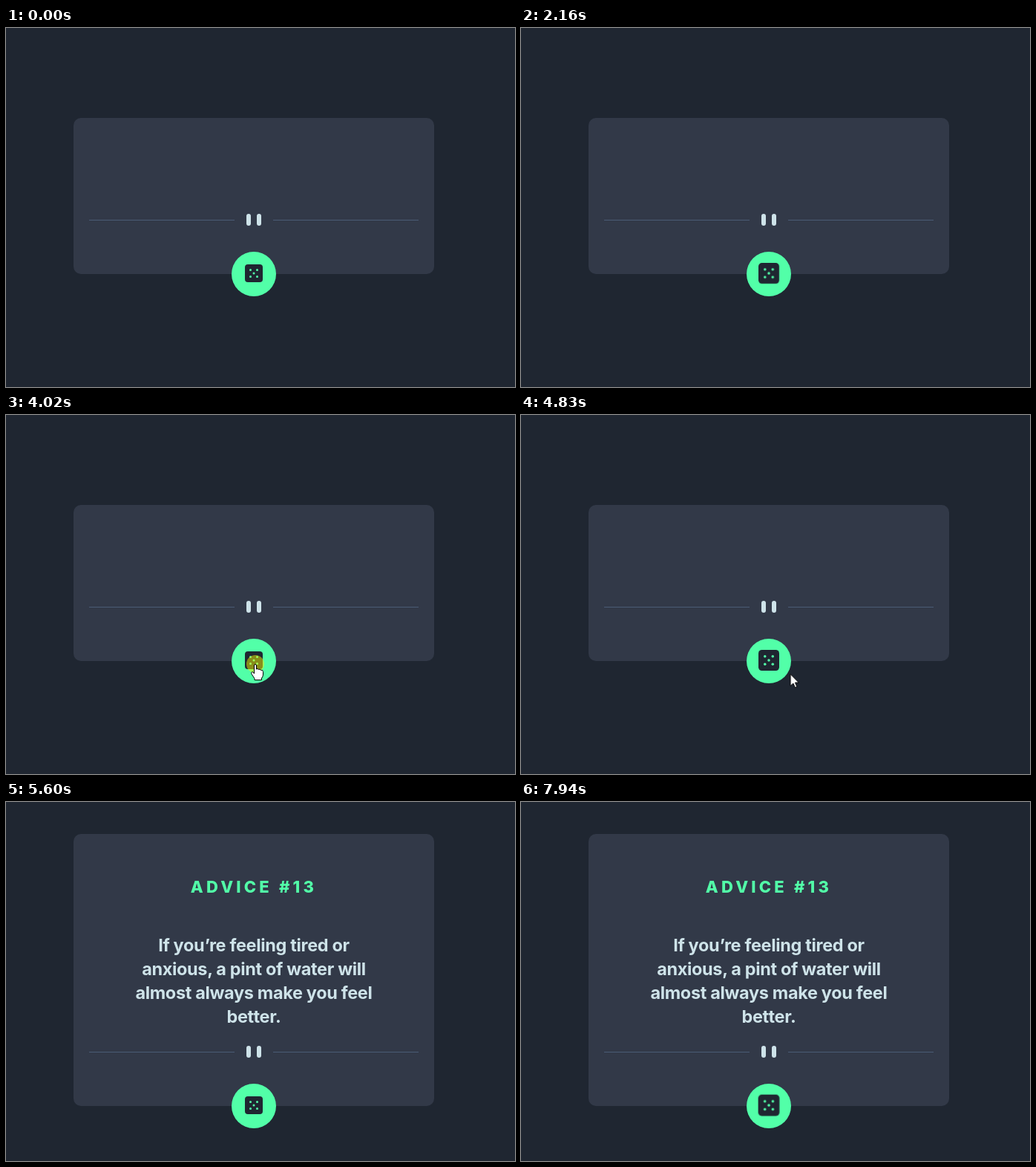
An HTML page for the animation above (8 s loop, 686 by 483 pixels).

```html
<!DOCTYPE html>
<html lang="en">
<head>
<meta charset="utf-8">
<title>Advice card</title>
<style>
  html, body {
    margin: 0;
    width: 100%;
    height: 100%;
    overflow: hidden;
    background: #1f2631;
  }
  svg { display: block; }

  /* Every animation shares one 8 s loop; "step" ones switch without easing. */
  .step { animation: 8s step-end infinite; }

  .card { fill: #323948; animation-name: card; }
  .lower { animation-name: lower; }
  .words { animation-name: words; }
  .rule { fill: #4a5b75; }
  .pale { fill: #cee3e9; }
  .green { fill: #52ffa8; }
  .ink { fill: #1f2631; }

  .die {
    transform-origin: 334px 330px;
    animation: beat 8s ease-in-out infinite;
  }

  text {
    font-family: Inter, "Open Sans", sans-serif;
    text-anchor: middle;
  }
  .title { font-size: 22px; font-weight: 800; letter-spacing: 4.2px; }
  .quote { font-size: 23.5px; font-weight: 700; letter-spacing: -.35px; }

  .pointer { animation: travel 8s linear infinite; }
  .pointer path { fill: #fff; stroke: #000; stroke-linejoin: round; }
  .arrow { animation-name: arrow; }
  .hand { animation-name: hand; }
  .click { fill: #ff0; fill-opacity: .47; animation-name: click; }

  @keyframes card {
    0% { y: 121px; height: 210px; }
    61.25%, 100% { y: 43px; height: 366px; }
  }
  @keyframes lower {
    0% { transform: translateY(0); }
    61.25%, 100% { transform: translateY(78px); }
  }
  @keyframes words {
    0% { visibility: hidden; }
    61.25%, 100% { visibility: visible; }
  }
  @keyframes beat {
    0%, 17.125%, 32.5%, 54.875%, 70.25%, 92.625% { transform: scale(1); }
    24.8125%, 62.5625%, 100% { transform: scale(1.2); }
  }
  @keyframes travel {
    0%, 33.125% { transform: translate(563px, 470px); }
    34% { transform: translate(510px, 446px); }
    34.875% { transform: translate(466px, 422px); }
    35.75% { transform: translate(433px, 402px); }
    36.625% { transform: translate(409px, 385px); }
    37.5% { transform: translate(390px, 371px); }
    38.375% { transform: translate(373px, 359px); }
    39.25% { transform: translate(360px, 350px); }
    40.25% { transform: translate(348px, 342px); }
    42%, 57.75% { transform: translate(336px, 335px); }
    58.625% { transform: translate(345px, 339px); }
    59.5% { transform: translate(354px, 344px); }
    60.375% { transform: translate(363px, 348px); }
    61.25% { transform: translate(371px, 351px); }
    62.125% { transform: translate(400px, 358px); }
    63% { transform: translate(460px, 371px); }
    63.875% { transform: translate(558px, 385px); }
    64.75%, 100% { transform: translate(658px, 396px); }
  }
  @keyframes arrow {
    0%, 39.25%, 65.625%, 100% { visibility: hidden; }
    33.125%, 60% { visibility: visible; }
  }
  @keyframes hand {
    0%, 60%, 100% { visibility: hidden; }
    39.25% { visibility: visible; }
  }
  @keyframes click {
    0%, 51.875%, 100% { visibility: hidden; }
    50.25% { visibility: visible; }
  }
</style>
</head>
<body>
<svg width="686" height="483" viewBox="0 0 686 483">
  <rect class="card step" x="91" y="121" width="486" height="210" rx="10"/>

  <g class="words step">
    <text class="title green" x="334" y="121.5">ADVICE #13</text>
    <g class="quote pale">
      <text x="334" y="201">If you’re feeling tired or</text>
      <text x="334" y="233">anxious, a pint of water will</text>
      <text x="334" y="265">almost always make you feel</text>
      <text x="334" y="297">better.</text>
    </g>
  </g>

  <g class="lower step">
    <rect class="rule" x="112" y="258" width="196" height="1"/>
    <rect class="rule" x="360" y="258" width="196" height="1"/>
    <rect class="pale" x="324" y="250" width="6" height="16" rx="3"/>
    <rect class="pale" x="338" y="250" width="6" height="16" rx="3"/>
    <circle class="green" cx="334" cy="331" r="30"/>
    <g class="die">
      <rect class="ink" x="322" y="318" width="24" height="24" rx="4"/>
      <g class="green">
        <circle cx="329.5" cy="325.5" r="1.5"/>
        <circle cx="338.5" cy="325.5" r="1.5"/>
        <circle cx="334" cy="330" r="1.5"/>
        <circle cx="329.5" cy="334.5" r="1.5"/>
        <circle cx="338.5" cy="334.5" r="1.5"/>
      </g>
    </g>
  </g>

  <g class="pointer">
    <circle class="click step" r="12"/>
    <path class="arrow step" d="M0 .5V16.5L3.8 13L6.3 18.6L8.8 17.5L6.4 12H11.3Z"/>
    <path class="hand step" d="M-1.5 13V2Q-1.5.5 0 .5T1.5 2V7Q3 5.5 4.5 7.5Q6 6.2 7.2 8.2Q10.5 7.5 10.5 10.5V14Q10.5 17 8.5 19V21.5H-1V19.5L-5 13.5Q-6 11-4 10.5Q-2.5 11-1.5 13Z"/>
  </g>
</svg>
</body>
</html>
```
